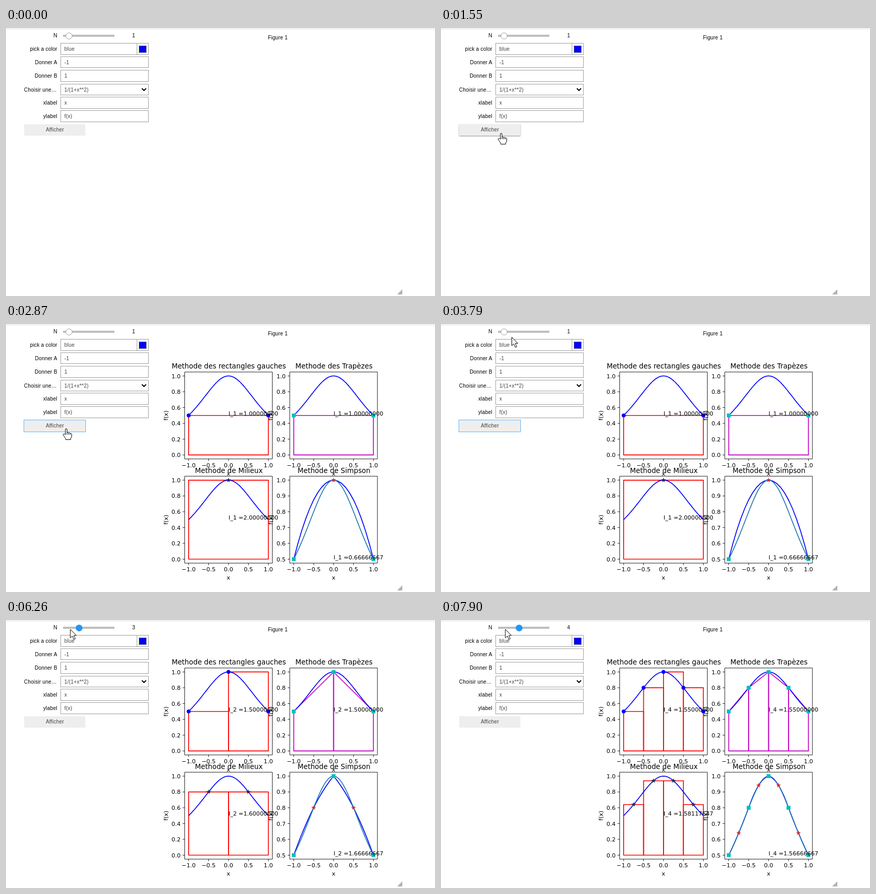
Animation, 827 px wide and 518 px high, one loop 8 s. Source, as an HTML page:

```html
<!DOCTYPE html>
<html lang="fr">
<head>
<meta charset="utf-8">
<title>Intégration numérique</title>
<style>
html, body { margin: 0; height: 100%; overflow: hidden; background: #fff; }
svg { display: block; width: 827px; height: 518px; }
.ui { font: 10px "Liberation Sans", Arial, sans-serif; letter-spacing: .18px; }
.box { fill: #fff; stroke: #9e9e9e; }
.value { fill: #444; }
.end { text-anchor: end; }
.mid { text-anchor: middle; }
#plots { font: 11.11px "DejaVu Sans", Verdana, sans-serif; fill: none; stroke-width: 1.67; }
#plots text { fill: #000; stroke: none; white-space: pre; }
#plots .title { font-size: 13.33px; }
#plots .axis { stroke: #000; stroke-width: .89; }
#cursor { fill: #fff; stroke: #000; stroke-linejoin: round; }
</style>
</head>
<body>
<svg viewBox="0 0 827 518">
  <defs>
    <linearGradient id="shade" x2="0" y2="1">
      <stop stop-color="#ececec"/><stop offset="1" stop-color="#fff"/>
    </linearGradient>
    <filter id="lift" x="-10%" y="-20%" width="120%" height="150%">
      <feDropShadow dx="0" dy="1" stdDeviation=".8" flood-opacity=".45"/>
    </filter>
  </defs>
  <rect width="827" height="5" fill="url(#shade)"/>
  <path d="M764 505V515H754Z" fill="#b3b3b3"/>
  <g class="ui">
    <text class="mid" x="524" y="22">Figure 1</text>
    <g id="form"></g>
    <rect x="110" y="13" width="99" height="4" fill="#bdbdbd"/>
    <circle id="knob" cy="15.4"/>
    <text id="count" class="mid" x="246" y="18"></text>
    <rect id="button"/>
    <text class="mid value" x="94.3" y="200">Afficher</text>
  </g>
  <g id="plots"></g>
  <path id="cursor"/>
</svg>
<script>
const $ = id => document.getElementById(id);
const set = (el, attrs) => { for (const k in attrs) el.setAttribute(k, attrs[k]); };
const text = (x, y, s, cls = '', more = '') => `<text x="${x}" y="${y}" class="${cls}" ${more}>${s}</text>`;
const path = (d, color, more = '') => `<path d="${d}" stroke="${color}" ${more}/>`;
const range = n => [...Array(n).keys()];
const sum = list => list.reduce((a, b) => a + b, 0);

// Form: label, value, top, height
const rows = [['pick a color', 'blue', 29, 22], ['Donner A', '-1', 55, 21], ['Donner B', '1', 81, 22],
  ['Choisir une…', '1/(1+x**2)', 108, 21], ['xlabel', 'x', 133, 22], ['ylabel', 'f(x)', 159, 22]];
$('form').innerHTML = text(98.9, 18, 'N', 'end') + rows.map(([label, value, y, height], i) =>
  text(i == 3 ? 97.6 : 98.9, y + 15, label, 'end') +
  `<rect class="box" x="105.5" y="${y + .5}" width="169" height="${height}"/>` +
  text(112.6, y + 15, value, 'value')).join('') +
  '<path d="M252.5 29V52" stroke="#9e9e9e"/>' +
  '<rect x="256.5" y="34.5" width="14" height="13" fill="#00f" stroke="#777"/>' +
  '<path d="M262 116.8L266 120.8L270 116.8" fill="none" stroke="#000" stroke-width="2"/>';

// Plots
const BLUE = '#00f', RED = '#f00', CYAN = '#00bfbf', PURPLE = '#bf00bf';
const f = x => 1 / (1 + x * x);

function axes(left, top, title, low) {
  const X = x => left + 84.5 + 76.8 * x;
  const Y = y => top + 7.6 + 152.7 * (1 - y) / (1 - low);
  const line = pts => 'M' + pts.map(([x, y]) => X(x).toFixed(2) + ' ' + Y(y).toFixed(2)).join('L');
  const marks = (pts, d, color) => pts.map(([x, y]) =>
    path(d, color, `fill="${color}" stroke-width="1.1" transform="translate(${X(x)} ${Y(y)})"`)).join('');
  const label = v => v.toFixed(1).replace('-', '−');
  let frame = `M${left} ${top}h169v168h-169Z`, labels = '';
  for (const x of [-1, -.5, 0, .5, 1]) {
    frame += `M${X(x)} ${top + 168}v3.9`;
    labels += text(X(x), top + 184.2, label(x), 'mid');
  }
  for (const i of range(6)) {
    const y = low + i * (1 - low) / 5;
    frame += `M${left} ${Y(y)}h-3.9`;
    labels += text(left - 7.8, Y(y) + 4.1, label(y), 'end');
  }
  labels += text(left + 85.2, top - 6.7, title, 'title mid') + text(X(0), top + 199.7, 'x', 'mid') +
    text(0, 0, 'f(x)', 'mid', `transform="translate(${left - 32.6} ${top + 84})rotate(-90)"`);
  const finish = (n, value) => `<path class="axis" d="${frame}"/>` + labels +
    text(X(0), Y(.5), `I_${n} =${value.toFixed(8)}`);
  return { line, marks, finish };
}

const circle = 'M-3.3 0a3.3 3.3 0 1 0 6.6 0a3.3 3.3 0 1 0 -6.6 0Z';
const square = 'M-3.2 -3.2h6.4v6.4h-6.4Z';
const star = 'M' + range(10).map(i => {
  const r = i % 2 ? 1.25 : 3.2, a = i * Math.PI / 5;
  return (r * Math.sin(a)).toFixed(2) + ' ' + (-r * Math.cos(a)).toFixed(2);
}).join('L') + 'Z';

function drawPlots(n) {
  if (!n) return '';
  const h = 2 / n, cells = range(n);
  const at = x => [x, f(x)];
  const nodes = range(n + 1).map(i => at(-1 + i * h));
  const mids = cells.map(i => at(-1 + (i + .5) * h));
  const curve = range(101).map(i => at(-1 + i / 50));
  const bars = (ax, color, y0, y1) => cells.map(i => {
    const a = nodes[i][0], b = nodes[i + 1][0];
    return path(ax.line([[a, 0], [a, y0(i)], [b, y1(i)], [b, 0]]) + 'Z', color);
  }).join('');

  const rect = axes(344.4, 92.8, 'Methode des rectangles gauches', 0);
  const trap = axes(547, 92.8, 'Methode des Trapèzes', 0);
  const mid = axes(344.4, 294.2, 'Methode de Milieux', 0);
  const simp = axes(547, 294.2, 'Methode de Simpson', .5);

  const leftY = i => nodes[i][1], rightY = i => nodes[i + 1][1], midY = i => mids[i][1];
  // One parabola per cell through both ends and the middle
  const parabolas = cells.flatMap(i => range(21).map(k => {
    const s = k / 20;
    return [nodes[i][0] + s * h, leftY(i) * (1 - s) * (1 - 2 * s) + midY(i) * 4 * s * (1 - s) + rightY(i) * s * (2 * s - 1)];
  }));
  const leftSum = h * sum(cells.map(leftY));
  const trapSum = h * sum(cells.map(i => (leftY(i) + rightY(i)) / 2));
  const midSum = h * sum(cells.map(midY));
  const simpSum = h / 3 * sum(nodes.map(([, y], i) => y * (i % n == 0 ? 1 : i % 2 ? 4 : 2)));

  return bars(rect, RED, leftY, leftY) + path(rect.line(curve), BLUE) +
      rect.marks(nodes, circle, BLUE) + rect.finish(n, leftSum) +
    bars(trap, PURPLE, leftY, rightY) + path(trap.line(curve), BLUE) +
      trap.marks(nodes, square, CYAN) + trap.finish(n, trapSum) +
    bars(mid, RED, midY, midY) + path(mid.line(curve), BLUE) +
      mid.marks(mids, star, '#12305c') + mid.finish(n, midSum) +
    path(simp.line(parabolas), BLUE) + path(simp.line(curve), '#1f77b4') +
      simp.marks(nodes, square, CYAN) + simp.marks(mids, star, '#d62728') + simp.finish(n, simpSum);
}

// Pointer: start time, step length, then one position per step
const moves = [
  [170, 77, [[681, 475], [560, 395], [430, 300], [321, 227]]],
  [630, 77, [[312, 214], [285, 178], [252, 142], [215, 112], [180, 95], [155, 90],
    [138, 108], [127, 142], [120, 174], [117, 195], [115.5, 202]]],
  [1480, 70, [[116, 203], [116.5, 203]]],
  [1990, 100, [[116.5, 202]]],
  [3330, 77, [[135, 190], [180, 160], [235, 120], [258, 84], [235, 54], [175, 32],
    [136.5, 25.5], [131, 22], [127, 20], [125, 18.5], [124, 18]]]
];
const shapes = {
  arrow: 'M0 0V16.5L3.9 12.9L6.8 19.6L9.6 18.4L6.7 11.9H11.6Z',
  hand: 'M-2 12V2Q-2 .5 -.5 .5T1.2 2V8Q3.2 6.6 4.2 8.5Q6.3 7.3 7.2 9.5Q9.6 8.6 10.2 11V15Q10.2 17 8.2 19V21.5H-1.5V19.5L-5.8 13Q-7 11 -5.5 10.3T-2 12ZM1.2 8V12M4.2 8.5V12M7.2 9.5V12',
  beam: 'M-3 -7.5H-1L0 -6.5L1 -7.5H3M0 -6.5V6.5M-3 7.5H-1L0 6.5L1 7.5H3'
};

function pointer(t) {
  const move = moves.filter(m => t >= m[0]).pop();
  if (!move) return null;
  const [start, step, spots] = move;
  return spots[Math.min(spots.length - 1, Math.floor((t - start + 5) / step))];
}

const latest = (t, steps) => steps.filter(s => t >= s[0]).pop()[1];
let shown = -1;

function draw(t) {
  const n = latest(t, [[0, 1], [5250, 2], [6260, 3], [7270, 4]]);
  const plotted = latest(t, [[0, 0], [2870, 1], [5800, 2], [6810, 3], [7900, 4]]);
  if (plotted != shown) $('plots').innerHTML = drawPlots(shown = plotted);

  const spot = pointer(t), [x, y] = spot || [-99, -99];
  const onButton = x > 35 && x < 153 && y > 186 && y < 208;
  const onField = x > 105 && x < 252 && rows.some((r, i) => i != 3 && y >= r[2] && y <= r[2] + r[3]);
  const shape = onButton ? 'hand' : onField ? 'beam' : 'arrow';
  set($('cursor'), { d: shapes[shape], transform: `translate(${x} ${y})`, visibility: spot ? 'visible' : 'hidden' });

  const pressed = t >= 1990 && t < 2330, focused = t >= 2330 && t < 4480;
  const grow = focused ? .5 : 0;
  set($('button'), {
    x: 35 - grow, y: 186 - grow, width: 118 + 2 * grow, height: 22 + 2 * grow,
    fill: pressed ? '#bdbdbd' : '#eee', stroke: focused ? '#64b5f6' : 'none',
    filter: pressed || onButton && !focused ? 'url(#lift)' : 'none'
  });

  const active = t >= 4020;
  set($('knob'), {
    cx: 121.5 + 9.7 * (n - 1), r: active ? t >= 4480 && t < 4640 ? 7.8 : 6.5 : 6,
    fill: active ? '#2196f3' : '#fff', stroke: active ? 'none' : '#9e9e9e'
  });
  $('count').textContent = n;
}

const begin = performance.now();
function tick() {
  draw((performance.now() - begin) % 8000);
  requestAnimationFrame(tick);
}
tick();
</script>
</body>
</html>
```
